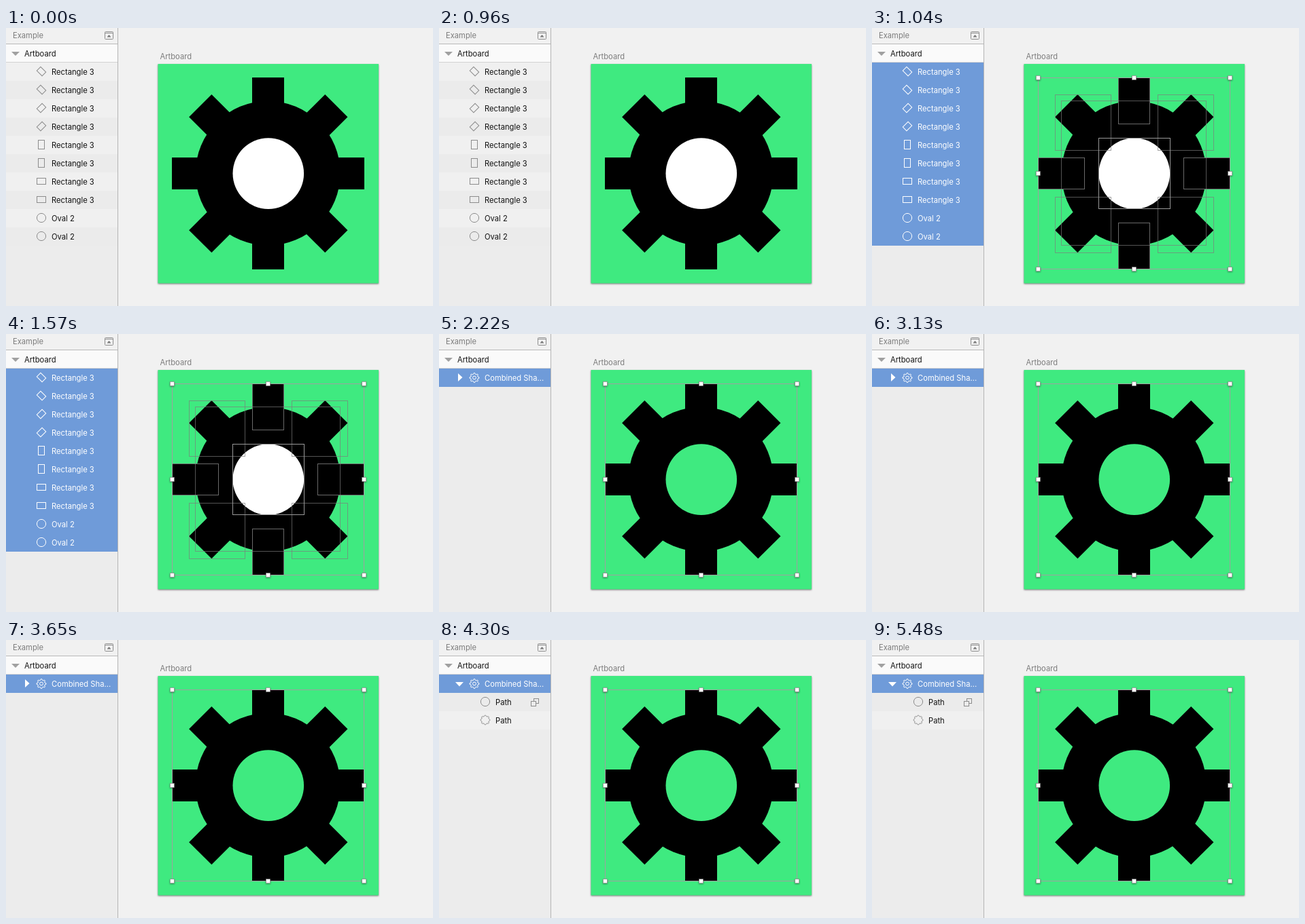
Write an HTML page that moves like this. It is 628 by 410 pixels and loops after 5.53 s.

```html
<!DOCTYPE html>
<html lang="en">
<head>
<meta charset="utf-8">
<title>Combining shapes into a gear</title>
<style>
  html, body { margin: 0; width: 100%; height: 100%; overflow: hidden; background: #f1f1f1; }
  svg { display: block; width: 628px; height: 410px; }
  text { font: 11.2px Inter, Roboto, sans-serif; fill: #111; }
  .muted { fill: #7c7c7c; }
  .selected text { fill: #fff; }
  .icon { fill: none; stroke: #8c8c8c; stroke-width: 1; }
  .selected .icon { stroke: #fff; }
  .shadow { filter: drop-shadow(0 1px 1px rgba(0, 0, 0, .5)); }
  .handle { fill: #fff; stroke: #8a8a8a; stroke-width: .7; filter: drop-shadow(0 1px 1px rgba(0, 0, 0, .4)); }
</style>
</head>
<body>
<svg id="stage" viewBox="0 0 628 410"></svg>
<script>
const LOOP = 5530;
const SELECT_AT = 1025, COMBINE_AT = 2160, EXPAND_AT = 3820;
const ROW_TOP = 51, ROW_HEIGHT = 27;
const BLUE = '#6f9bd9', GREEN = '#3fea80';

// Gear parts, each with its own centre
const CX = 385.5, CY = 214.5, REACH = 107;
const tooth = { long: 69, wide: 47 };
const body = { x: 385.2, y: 214.2, r: 106.5 };
const hole = { x: 385.8, y: 214.6, r: 52.3 };
const diagonal = { x: 385.8, y: 214.7 };

const rect = (x, y, w, h, attrs = '') =>
  `<rect x="${x}" y="${y}" width="${w}" height="${h}" ${attrs}/>`;
const box = (cx, cy, w, h, attrs) => rect(cx - w / 2, cy - h / 2, w, h, attrs);
const circle = (cx, cy, r, attrs = '') => `<circle cx="${cx}" cy="${cy}" r="${r}" ${attrs}/>`;
const path = (d, attrs = '') => `<path d="${d}" ${attrs}/>`;
const label = (x, y, text, attrs = '') => `<text x="${x}" y="${y}" ${attrs}>${text}</text>`;
const group = (content, attrs = '') => `<g ${attrs}>${content}</g>`;
const range = n => [...Array(n).keys()];
const rowMiddle = i => ROW_TOP + ROW_HEIGHT * i + 14;

// Small toothed outline for the layer icons
function cog(cx, cy, outer, inner) {
  const points = range(32).map(i => {
    const r = i % 4 < 2 ? outer : inner;
    const a = (i - .5) * Math.PI / 16;
    return `${(cx + r * Math.cos(a)).toFixed(2)} ${(cy + r * Math.sin(a)).toFixed(2)}`;
  });
  return path(`M${points.join('L')}Z`, 'stroke-linejoin="round"');
}

const icons = {
  left: y => box(52, y - 1, 11, 8, `transform="rotate(45 52 ${y - 1})"`),
  right: y => box(52, y - 1, 11, 8, `transform="rotate(-45 52 ${y - 1})"`),
  tall: y => box(52, y - 1, 9, 13),
  wide: y => box(52, y - 1, 13, 9),
  oval: y => circle(52, y - 1, 6.6)
};
const layers = ['left', 'left', 'right', 'right', 'tall', 'tall', 'wide', 'wide', 'oval', 'oval'];

function rowBands(first, count) {
  return range(count).map(n => {
    const i = first + n;
    return rect(0, ROW_TOP + i * ROW_HEIGHT, 164, ROW_HEIGHT, `fill="${i % 2 ? '#ebebeb' : '#f0f0f0'}"`);
  }).join('');
}

function layerRows() {
  const items = layers.map((kind, i) => {
    const y = rowMiddle(i);
    return group(icons[kind](y), 'class="icon"') +
      label(67, y + 4, kind === 'oval' ? 'Oval 2' : 'Rectangle 3');
  }).join('');
  return rowBands(0, layers.length) +
    rect(0, ROW_TOP, 164, ROW_HEIGHT * layers.length, `id="highlight" fill="${BLUE}"`) + items;
}

function combinedRow() {
  const y = rowMiddle(0);
  return rect(0, ROW_TOP, 164, ROW_HEIGHT, `fill="${BLUE}"`) +
    path('M28 58L34.5 64L28 70Z', 'id="closed" fill="#fff"') +
    path('M24 62L36 62L30 68.5Z', 'id="open" fill="#fff"') +
    group(cog(52, y - .5, 7, 5.3) + circle(52, y - .5, 2.4), 'class="icon"') +
    label(67, y + 4, 'Combined Sha...');
}

function childRows() {
  const a = rowMiddle(1), b = rowMiddle(2);
  return rowBands(1, 2) +
    group(circle(68, a - 1, 6.6) + cog(68, b - 1, 6.9, 5.6) +
      rect(139.5, 86.5, 7, 7) + rect(135.5, 90.5, 7, 7, 'fill="#ebebeb"'), 'class="icon"') +
    label(83, a + 4, 'Path') + label(83, b + 4, 'Path');
}

function sidebar() {
  return rect(0, 0, 164, 410, 'fill="#ececec"') +
    rect(0, 0, 164, 23, 'fill="#f1f1f1"') +
    rect(0, 23, 164, 1, 'fill="#b9b9b9"') +
    rect(0, 24, 164, 26, 'fill="#fafafa"') +
    rect(0, 50, 164, 1, 'fill="#d3d3d3"') +
    label(10, 15, 'Example', 'class="muted"') +
    group(rect(145.5, 5.5, 12, 11, 'rx="1"') + path('M146 7.5H157'), 'class="icon"') +
    path('M148.5 13.5L151.5 10L154.5 13.5Z', 'fill="#777"') +
    path('M8 35H20L14 41Z', 'fill="#a0a0a0"') +
    label(27, 42, 'Artboard') +
    group(layerRows(), 'id="layers"') +
    group(combinedRow(), 'id="combined" class="selected"') +
    group(childRows(), 'id="children"') +
    rect(164, 0, 1, 410, 'fill="#b4b4b4"');
}

function gear() {
  const teeth = range(8).map(i => {
    const c = i % 2 ? diagonal : { x: CX, y: CY };
    return box(c.x, c.y - REACH, tooth.wide, tooth.long, `transform="rotate(${i * 45} ${c.x} ${c.y})"`);
  }).join('');
  return teeth + circle(body.x, body.y, body.r) + circle(hole.x, hole.y, hole.r, 'id="hole"');
}

// One-pixel frame on the pixel grid around a shape's bounds
function bounds(cx, cy, w, h, attrs) {
  const snap = v => Math.floor(v) + .5;
  const x = snap(cx - w / 2), y = snap(cy - h / 2);
  return rect(x, y, snap(cx + w / 2) - x, snap(cy + h / 2) - y, attrs);
}

function outlines() {
  const offset = REACH * Math.SQRT1_2;
  const size = (tooth.long + tooth.wide) * Math.SQRT1_2;
  const diagonals = [-1, 1].flatMap(x => [-1, 1].map(y =>
    bounds(diagonal.x + x * offset, diagonal.y + y * offset, size, size))).join('');
  const straight = [-1, 1].map(s =>
    box(CX, CY + s * REACH, tooth.wide - 1, tooth.long - 1) +
    box(CX + s * REACH, CY, tooth.long - 1, tooth.wide - 1)).join('');
  return group(diagonals + bounds(body.x, body.y, body.r * 2, body.r * 2),
    'stroke="#7c7c7c" stroke-opacity=".68"') +
    group(straight, 'stroke="#8c8c8c" stroke-opacity=".75"') +
    bounds(hole.x, hole.y, hole.r * 2, hole.r * 2, 'stroke="#999"');
}

function selectionFrame() {
  const handles = [-1, 0, 1].flatMap(x => [-1, 0, 1].map(y =>
    x || y ? box(CX + x * 141.2, CY + y * 141.2, 6, 6, 'class="handle"') : '')).join('');
  return box(CX, CY, 282, 282, 'fill="none" stroke="#a0a0a0"') + handles;
}

const stage = document.getElementById('stage');
stage.innerHTML = rect(0, 0, 628, 410, 'fill="#f1f1f1"') +
  sidebar() +
  label(226.5, 46, 'Artboard', 'class="muted"') +
  rect(223.5, 53, 324.5, 323.5, `fill="${GREEN}" class="shadow"`) +
  gear() +
  group(outlines(), 'id="outlines" fill="none"') +
  group(selectionFrame(), 'id="selection"');

const part = id => document.getElementById(id);
const show = (id, visible) => part(id).setAttribute('display', visible ? 'inline' : 'none');

function render(t) {
  const selected = t >= SELECT_AT;
  const combined = t >= COMBINE_AT;
  const expanded = t >= EXPAND_AT;
  show('layers', !combined);
  show('highlight', selected);
  part('layers').setAttribute('class', selected ? 'selected' : '');
  show('combined', combined);
  show('closed', !expanded);
  show('open', expanded);
  show('children', expanded);
  show('outlines', selected && !combined);
  show('selection', selected);
  part('hole').setAttribute('fill', combined ? GREEN : '#fff');
}

const start = performance.now();
function tick() {
  render((performance.now() - start) % LOOP);
  requestAnimationFrame(tick);
}
tick();
</script>
</body>
</html>
```
